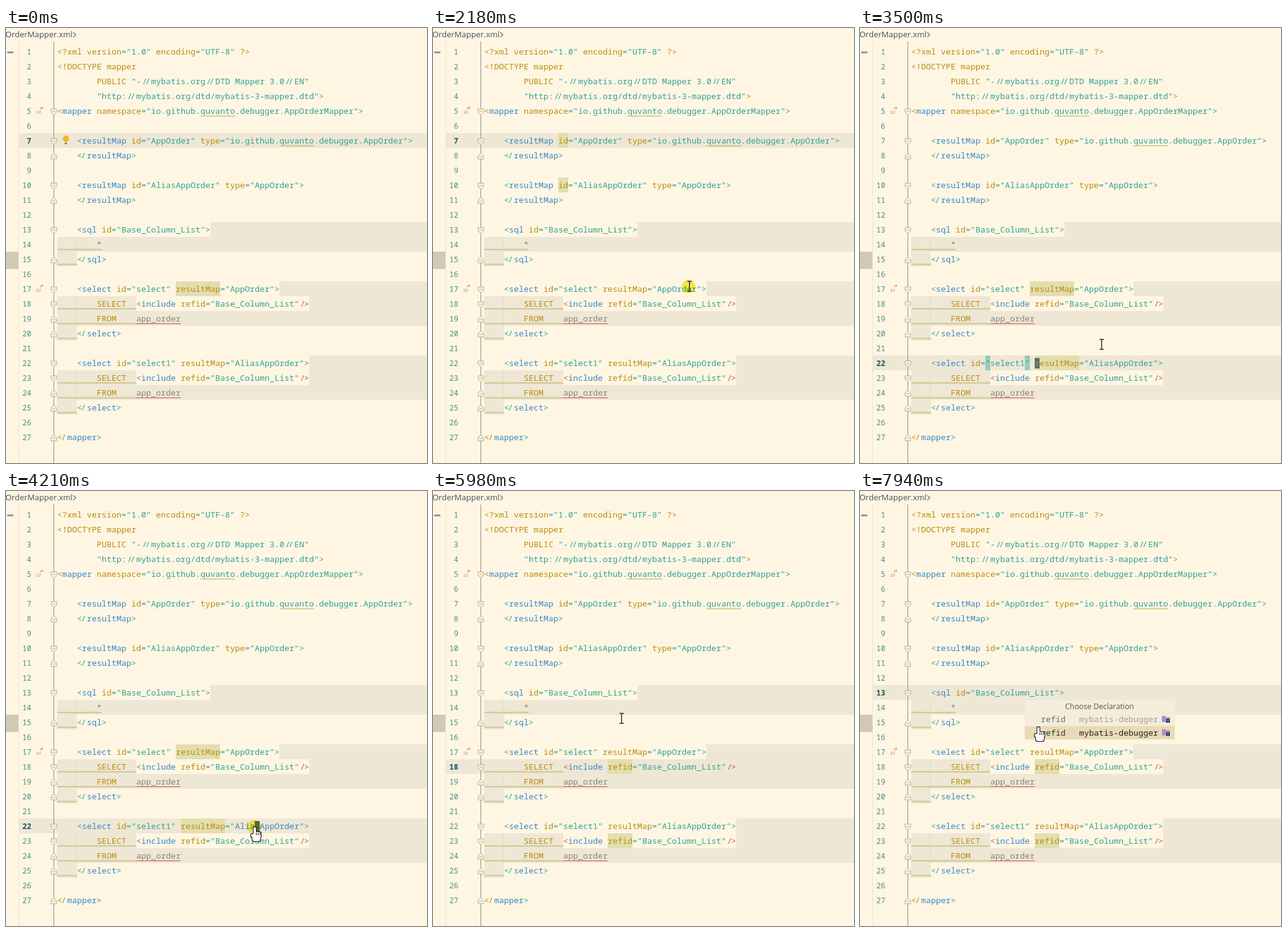
These frames come from a looping animation (682x704 px, 8 s). An HTML page with a canvas:

```html
<!DOCTYPE html>
<html lang="en">
<head>
<meta charset="utf-8">
<title>Mapper navigation</title>
<style>
html, body { margin: 0; width: 100%; height: 100%; overflow: hidden; background: #fef6e3; }
canvas { display: block; }
</style>
</head>
<body>
<canvas id="stage" width="682" height="704"></canvas>
<script>
(() => {
const g = document.getElementById('stage').getContext('2d');
const LOOP = 8000, WIDTH = 682, LEFT = 83, CH = 8, ROW = 24, BLINK = 465;
const BG = '#fef6e3', BAND = '#eee7d5', BLUE = '#3a86c8', TEAL = '#35a093',
      OCHRE = '#bb8b0c', ORANGE = '#cb5a1e', GREY = '#85847a', OLIVE = '#aaa03c';
const MONO = '"Noto Sans Mono", "DejaVu Sans Mono", monospace';
const SANS = '"Open Sans", "Noto Sans", sans-serif';
const CODE = '13.333px ' + MONO;

const lines = `<?xml version="1.0" encoding="UTF-8" ?>
<!DOCTYPE mapper
        PUBLIC "-//mybatis.org//DTD Mapper 3.0//EN"
        "http://mybatis.org/dtd/mybatis-3-mapper.dtd">
<mapper namespace="io.github.quvanto.debugger.AppOrderMapper">

    <resultMap id="AppOrder" type="io.github.quvanto.debugger.AppOrder">
    </resultMap>

    <resultMap id="AliasAppOrder" type="AppOrder">
    </resultMap>

    <sql id="Base_Column_List">
        *
    </sql>

    <select id="select" resultMap="AppOrder">
        SELECT  <include refid="Base_Column_List"/>
        FROM    app_order
    </select>

    <select id="select1" resultMap="AliasAppOrder">
        SELECT  <include refid="Base_Column_List"/>
        FROM    app_order
    </select>

</mapper>`.split('\n');

const rowTop = n => 26 + ROW * (n - 1);
const xOf = (n, word, offset = 0) => LEFT + CH * (lines[n - 1].indexOf(word) + offset);
const tagOf = s => (s.match(/<(\w+)/) || [])[1];

// A click on a name leads from one place to another; places are line, word, offset.
// Where there are several targets, a popup opens and the pointer goes to `pick` first.
const jumps = [
  { at: -1000, from: [7], to: [7] },
  { at: 860, arrive: 610, from: [7, 'AppOrder', 0], to: [17, 'resultMap'] },
  { at: 2100, arrive: 1640, from: [17, 'AppOrder', 7], to: [7, 'id'] },
  { at: 2940, arrive: 2720, from: [10, 'AliasAppOrder', 8], to: [22, 'resultMap'] },
  { at: 4210, arrive: 3960, from: [22, 'AliasAppOrder', 4], to: [10, 'id'] },
  { at: 5150, arrive: 4920, from: [13, 'Base_Column_List', 8], to: [18, 'refid'],
    land: 5980, pick: [5900, 6290, 305, 368] },
  { at: 7160, arrive: 6520, from: [13, 'Base_Column_List', 10], to: [18, 'refid'],
    land: LOOP, pick: [7770, LOOP, 289, 382] }
];
// Pointer rests: arrival, departure, x, y
const stops = [[70, 70, 586, 620]];
for (const j of jumps) {
  j.leave = j.at + (j.pick ? 150 : 85);
  j.land ??= j.leave;
  if (j.arrive) stops.push([j.arrive, j.leave, xOf(...j.from), rowTop(j.from[0]) + 14]);
  if (j.pick) stops.push(j.pick);
}

function rect(x, y, w, h, color) {
  g.fillStyle = color;
  g.fillRect(x, y, w, h);
}

function disc(x, y, r, color) {
  g.fillStyle = color;
  g.beginPath();
  g.arc(x, y, r, 0, 7);
  g.fill();
}

function stroke(points, color, width = 1, fill) {
  g.beginPath();
  points.forEach(([x, y]) => g.lineTo(x, y));
  if (fill) {
    g.closePath();
    g.fillStyle = fill;
    g.fill();
  }
  g.strokeStyle = color;
  g.lineWidth = width;
  g.stroke();
}

function text(s, x, y, color, font, align = 'left') {
  g.font = font;
  g.fillStyle = color;
  g.textAlign = align;
  g.fillText(s, x, y);
}

function colorOf(token, before, n) {
  if (token[0] === '"' || token === '=') return TEAL;
  if (n < 5) return OCHRE;
  if (/^(\*|app_order)$/.test(token)) return GREY;
  if (token === '/>') return ORANGE;
  if (token[0] === '<') return /mapper/.test(lines[n - 1]) ? OCHRE : /include/.test(lines[n - 1]) ? ORANGE : TEAL;
  if (token === '>') return TEAL;
  return before[0] === '<' ? BLUE : OCHRE;
}

// Slashes sit closer to their neighbours, as in a coding ligature.
function nudge(s, i) {
  if (s[i] !== '/') return 0;
  if (/[<\/]/.test(s[i - 1])) return -1.4;
  return /[>\/]/.test(s[i + 1]) ? 1.4 : 0;
}

function codeLine(s, n, link) {
  const from = link ? s.indexOf(link) : -1, to = link ? from + link.length : -1;
  let before = '';
  for (const { 0: token, index } of s.matchAll(/"[^"]*"|=|<\/?|\/?>|[^\s"=<>\/]+/g)) {
    const color = colorOf(token, before, n);
    for (let i = index; i < index + token.length; i++)
      text(s[i], LEFT + i * CH + nudge(s, i), rowTop(n) + 17, i >= from && i < to ? BLUE : color, CODE);
    before = token;
  }
}

function wave(n, a, b) {
  const points = [];
  for (let x = a; x <= b; x += 2) points.push([x, rowTop(n) + ((x - a) % 4 ? 19.5 : 21.5)]);
  stroke(points, OLIVE);
}

// Calls back for each line of embedded SQL with the end of its plain part.
function eachSql(visit) {
  let inside = false;
  lines.forEach((s, i) => {
    const closing = /<\//.test(s);
    if (inside) visit(i + 1, s, s.search(/<|app_order|$/) * CH + LEFT);
    if (/<(sql|select)/.test(s)) {
      inside = true;
      rect(LEFT + s.length * CH, rowTop(i + 1), WIDTH, ROW, BAND);
    } else if (closing) inside = false;
  });
}

function sqlBand(n, s, end) {
  const y = rowTop(n), tag = s.includes('<');
  rect(LEFT, y, (tag ? end : WIDTH) - LEFT, ROW, BAND);
  if (s.includes('include')) rect(LEFT + s.length * CH, y, WIDTH, ROW, BAND);
  if (!/<\//.test(s)) rect(113, y, 1, ROW, '#e0dac8');
}

function fold(n, dir) {
  const y = rowTop(n) + 13.5;
  stroke([[73, -4.5], [82, -4.5], [82, 1], [77.5, 5], [73, 1]].map(([x, d]) => [x, y + d * dir]), '#aaa892', 1, BG);
  stroke([[75, y - .5 * dir], [80, y - .5 * dir]], '#aaa892');
}

function gutterIcon(n) {
  const y = rowTop(n) + 8;
  text('sx', 49, y + 9, '#c39a6b', 'italic 9px ' + SANS);
  stroke([[56, y + 2], [56, y - 1], [60, y - 1]], '#e08a3c');
  stroke([[58, y - 3], [60, y - 1], [58, y + 1]], '#e08a3c');
}

function bulb(n) {
  const y = rowTop(n) + 9;
  disc(97, y, 5, '#f4b61b');
  rect(95, y + 4, 4, 2, '#f4b61b');
  rect(95, y + 7, 4, 2, '#77756c');
}

function popup(x, picked) {
  rect(x, 338, 243, 64, '#f4eddb');
  text('Choose Declaration', x + 121, 353, '#555a57', '12.3px ' + SANS, 'center');
  for (let i = 0; i < 2; i++) {
    const y = 359 + i * 21.5;
    if (i === picked) rect(x, y, 243, 21.5, '#e8dbb4');
    text('refid', x + 26, y + 15, i === picked ? '#333' : '#6b706c', CODE);
    text('mybatis-debugger', x + 88, y + 15, i === picked ? '#222' : '#a3a198', CODE);
    rect(x + 222, y + 5, 6, 3, '#b18ad6');
    rect(x + 222, y + 7, 13, 8, '#b18ad6');
    rect(x + 229, y + 10, 6, 6, '#23404a');
    rect(x + 231, y + 12, 2, 2, '#6fb4c4');
  }
}

function pointerAt(t) {
  const i = stops.findLastIndex(s => s[0] <= t);
  if (i < 0) return null;
  const [, leave, x, y] = stops[i], next = stops[i + 1];
  if (t <= leave || !next) return [x, y];
  const k = 1 - (1 - (t - leave) / (next[0] - leave)) ** 3;
  return [x + (next[2] - x) * k, y + (next[3] - y) * k];
}

function hand(x, y) {
  const layer = (color, grow) => {
    g.fillStyle = color;
    g.beginPath();
    g.roundRect(x - 2 - grow, y - grow, 4 + 2 * grow, 16 + 2 * grow, 2);
    g.roundRect(x - 6 - grow, y + 11 - grow, 6 + 2 * grow, 5 + 2 * grow, 2);
    g.roundRect(x - 2 - grow, y + 8 - grow, 12 + 2 * grow, 9 + 2 * grow, 3);
    g.roundRect(x - 4 - grow, y + 13 - grow, 13 + 2 * grow, 10 + 2 * grow, 4);
    g.fill();
  };
  layer('#111', 1);
  layer('#fff', 0);
  for (let dx = 2; dx < 9; dx += 3) rect(x + dx, y + 9, 1, 4, '#111');
}

function beam(x, y) {
  x = Math.round(x) + .5;
  y = Math.round(y);
  stroke([[x, y - 8], [x, y + 8]], '#222', 1.4);
  for (const d of [-8, 8]) stroke([[x - 3.5, y + d], [x + 3.5, y + d]], '#222', 1.4);
}

function draw(t) {
  const i = jumps.findLastIndex(j => j.at <= t), jump = jumps[i];
  const landed = t >= jump.land, [row, word, offset] = landed ? jump.to : jump.from;
  const [markLine, mark] = landed ? jump.to : jumps[i - 1].to;
  const picking = jump.pick && t >= jump.leave && !landed;
  const hover = jumps.find(j => t >= j.arrive && t < j.leave);
  const caret = word && xOf(row, word, offset);
  // The caret shows at once on a click, a moment later after a jump.
  const phase = (t - (landed ? jump.land + 75 : jump.at) + 2 * BLINK) % (2 * BLINK);

  rect(0, 0, WIDTH, 704, BG);
  rect(20, 22, 1, 682, '#ece5d3');
  rect(0, 362, 20, 28, '#d0c9b6');
  rect(2, 38, 10, 3, '#8b98a8');
  text('OrderMapper.xml', -1, 15, '#45535a', '13px ' + SANS);
  stroke([[109, 7], [113, 11], [109, 15]], '#66706f', 1.2);

  eachSql(sqlBand);
  rect(21, rowTop(row), WIDTH, ROW, BAND);
  lines.forEach((s, k) => {
    const same = mark ? tagOf(s) === tagOf(lines[markLine - 1]) : k === 16;
    const name = mark || 'resultMap';
    if (same) rect(xOf(k + 1, name), rowTop(k + 1), name.length * CH, ROW, '#e3deb0');
  });
  if (word === 'resultMap')
    for (const x of [xOf(row, '"'), caret - 2 * CH]) rect(x, rowTop(row), CH, ROW, '#94cdb9');
  if (caret && !picking && phase < BLINK) rect(caret, rowTop(row) + 4, CH, 17, '#586e75');

  rect(77, 22, 1, 682, '#8e9089');
  lines.forEach((s, k) => {
    const n = k + 1, now = n === row;
    if (/^\s*<[a-z]|SELECT/.test(s)) fold(n, 1);
    if (/<\/|FROM/.test(s)) fold(n, -1);
    text(n, 41, rowTop(n) + 17, now ? '#14525f' : '#4b8a90', (now ? 'bold ' : '') + '12px ' + MONO, 'right');
    codeLine(s, n, hover && hover.from[0] === n && hover.from[1]);
    if (s.includes('quvanto')) wave(n, xOf(n, 'quvanto'), xOf(n, 'quvanto', 7));
    if (s.includes('app_order')) rect(xOf(n, 'app_order'), rowTop(n) + 20, 9 * CH, 1, '#d8473f');
  });
  eachSql((n, s, end) => wave(n, LEFT, end));
  gutterIcon(5);
  gutterIcon(17);

  if (landed && word !== 'id' && t > jump.land + 780) bulb(row);
  const pointer = pointerAt(t);
  if (picking) popup(caret, pointer[1] > 379 ? 1 : 0);
  if (!pointer) return;
  const [x, y] = pointer;
  if (!jump.pick && t < jump.leave + 60) {
    g.globalCompositeOperation = 'multiply';
    disc(x - 1, y, 11, '#f7f057');
    g.globalCompositeOperation = 'source-over';
  }
  (picking || hover && !hover.pick ? hand : beam)(x, y);
}

// A slight lead keeps changes from falling just after their time.
const start = performance.now() - 10;
function tick() {
  draw((performance.now() - start) % LOOP);
  requestAnimationFrame(tick);
}
tick();
})();
</script>
</body>
</html>
```
